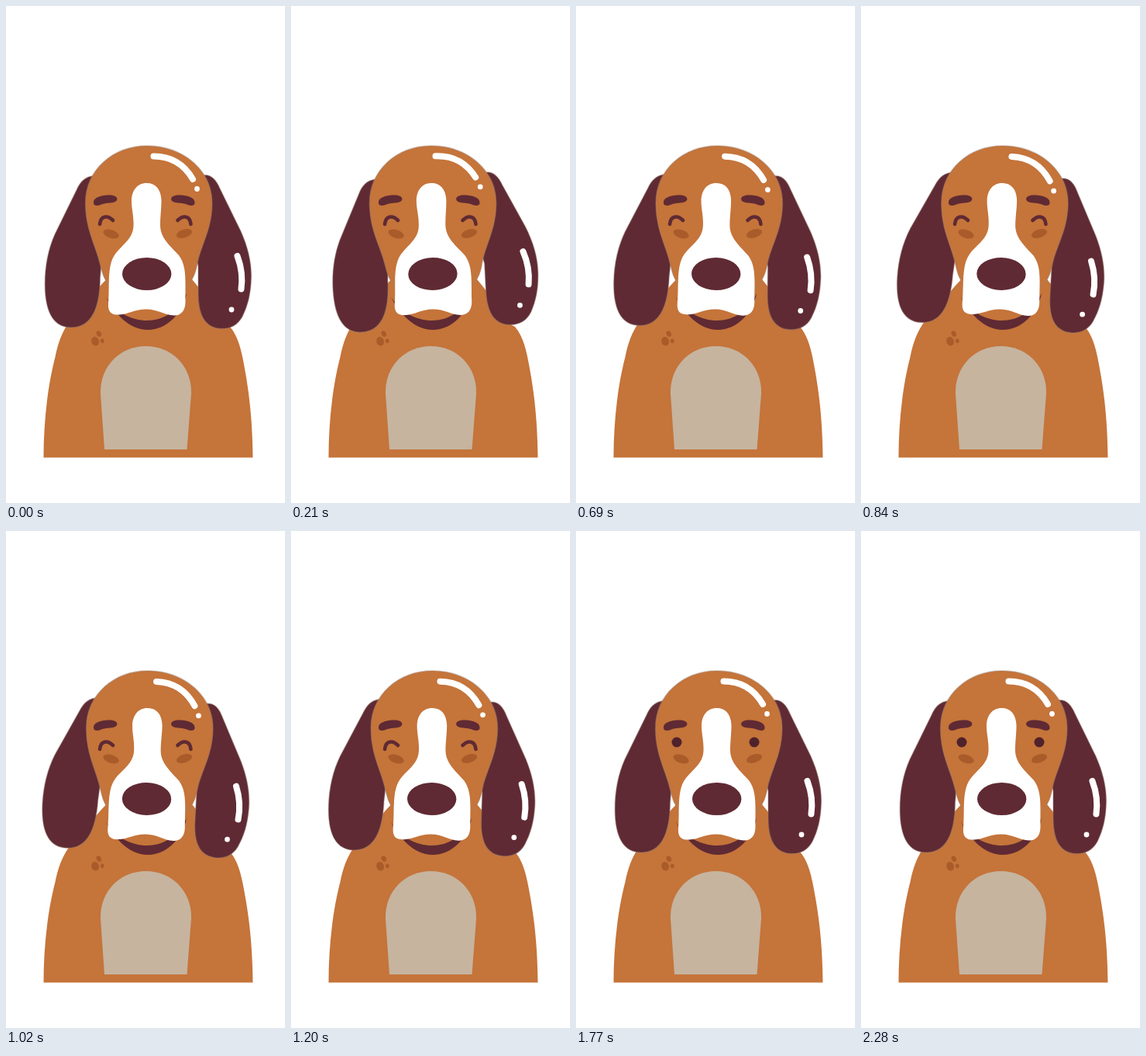
An HTML page that plays this animation: 360x640 px, repeating every 2.31 s.

```html
<!DOCTYPE html>
<html lang="en">
<head>
<meta charset="utf-8">
<title>Dog shaking its head</title>
<style>
  html, body { margin: 0; height: 100%; overflow: hidden; background: #fff; }
  svg { display: block; width: 100vw; height: 100vh; }
  .fur { fill: #c5743a; }
  .dark { fill: #5f2a33; }
  .tan { fill: #a95b29; }
  .white { fill: #fff; }
  .soft { stroke: #9a8074; stroke-opacity: .4; stroke-width: 1.4; }
  .line { fill: none; stroke-linecap: round; }
  .shine { stroke: #fff; stroke-width: 8; }
  .lid { stroke: #5f2a33; stroke-width: 4.6; }
</style>
</head>
<body>
<svg viewBox="0 0 360 640">
  <path class="fur" d="M48.500 581.500C48.500 535 54 488 63.500 452C67 434 72 421 80 409L121 361L134 347H236L249 363L285 411L289 413C300 426 304 444 308 467C315 505 318 540 318.500 581.500Z"/>
  <path fill="#c6b49f" d="M127 571L122 499C121 464 147 438 180.500 438S240 464 239 499L233.500 571Z"/>
  <g class="tan">
    <ellipse cx="115.200" cy="431.800" rx="4.800" ry="5.800" transform="rotate(-20 115 432)"/>
    <ellipse cx="119.800" cy="422" rx="3" ry="4" transform="rotate(-25 120 422)"/>
    <ellipse cx="124.300" cy="431.200" rx="2.300" ry="2.800"/>
  </g>
  <path id="leftEar" class="dark soft" d="M114 218.500C102 219.500 96 226 91 237L63 294C54.500 313 50.200 335 50.200 358C50.200 395 62 414 84 414C110 414 121 390 121.500 350L124 320L130 280Z"/>
  <g id="rightEar">
    <path class="dark soft" d="M254 218C264 216 271 223 276 235L303 290C312 310 317 330 316.500 350C316 371 312 386 305 400C299 411 290 415.500 278 415.500C258 415 248 400 248 370V335L244 318L236 280Z"/>
    <path class="line shine" d="M298.500 322Q306.500 343 303.500 364.500"/>
    <circle class="white" cx="291" cy="391" r="3.400"/>
  </g>
  <path id="head" class="fur soft" d="M182 180C228 180 266 211 266 254C266 288 251 309 247 331C245 344 241 352 236 358L218 375H150L133 359C126 352 124 343 121 331C116 309 102.500 288 102.500 254C102.500 211 138 180 182 180Z"/>
  <g id="gloss">
    <path class="line shine" d="M190.500 193.500C213 193.500 230 204 241 223"/>
    <circle class="white" cx="246.500" cy="235.500" r="3.400"/>
  </g>
  <path class="dark" d="M128.500 374C142 395 162 405 182 405S222 394 233 370C228 395 208 417 183 417S140 395 128.500 374Z"/>
  <g id="muzzle">
    <path class="white" d="M181.500 228C169 228 162 238 162 251C162 262 165 270 164.500 283C164 300 150 307 140.500 320C130 335 134 360 132 384C131.500 394 136 398 146 397.500C158 397 166 390.500 181 390.500C196 390.500 204 398 217 398.500C227 398.500 231.500 391 231.500 381C231 354 234 336 223 321C212 309 199.500 299 199 283C199 270 200.500 262 200.500 250C200 236 193 228 181.500 228Z"/>
    <ellipse class="dark" cx="181.700" cy="345" rx="31.700" ry="21"/>
  </g>
  <path id="brow" class="dark" d="M113 253C113 246 124 243.500 134 243.500C143 243.500 146 249 141 252C136 254.500 128 253 122 256C117 258 112.500 257 113 253Z"/>
  <use href="#brow" transform="matrix(-1 0 0 1 356.500 0)"/>
  <ellipse id="cheek" class="tan" cx="135.500" cy="293.500" rx="10.500" ry="5.300" transform="rotate(18 135.500 293.500)"/>
  <use href="#cheek" transform="matrix(-1 0 0 1 365.500 -.5)"/>
  <g id="closed">
    <path id="lid" class="line lid" d="M121 281C122 270 131 269 138 276"/>
    <use href="#lid" transform="matrix(-1 0 0 1 359.500 0)"/>
  </g>
  <g id="open" fill="#50222b">
    <circle cx="130" cy="272" r="6.500"/>
    <circle cx="230" cy="272" r="6.500"/>
  </g>
</svg>
<script>
const LOOP = 2310, STEP = 30, EYES_OPEN = 1560;
const LEFT = 320, RIGHT = 880, REST = 1500;
const part = id => document.getElementById(id);

// Cosine easing from 0 to 1 between two times.
function ease(t, from, to) {
  const u = Math.min(1, Math.max(0, (t - from) / (to - from)));
  return (1 - Math.cos(Math.PI * u)) / 2;
}

// One shake: 0 to -1, over to 0.75, back to 0.
function shake(t) {
  return -ease(t, 0, LEFT) + 1.75 * ease(t, LEFT, RIGHT) - .75 * ease(t, RIGHT, REST);
}

function turn(id, angle, cy, dx = 0) {
  part(id).setAttribute('transform', `translate(${dx} 0) rotate(${angle} 182 ${cy})`);
}

function draw(now) {
  const t = Math.floor(now % LOOP / STEP) * STEP;
  const tilt = 3.2 * shake(t);
  turn('leftEar', 5 * shake(t), 300);
  turn('rightEar', 4.8 * shake(t - STEP), 300);
  turn('gloss', tilt, 290);
  turn('head', tilt * .32, 345);
  turn('muzzle', tilt * .36, 345, -1.3 * shake(t * 1.3));
  const awake = t >= EYES_OPEN;
  part('open').style.display = awake ? '' : 'none';
  part('closed').style.display = awake ? 'none' : '';
}

const start = performance.now();
function tick() {
  draw(performance.now() - start);
  requestAnimationFrame(tick);
}
tick();
</script>
</body>
</html>
```
